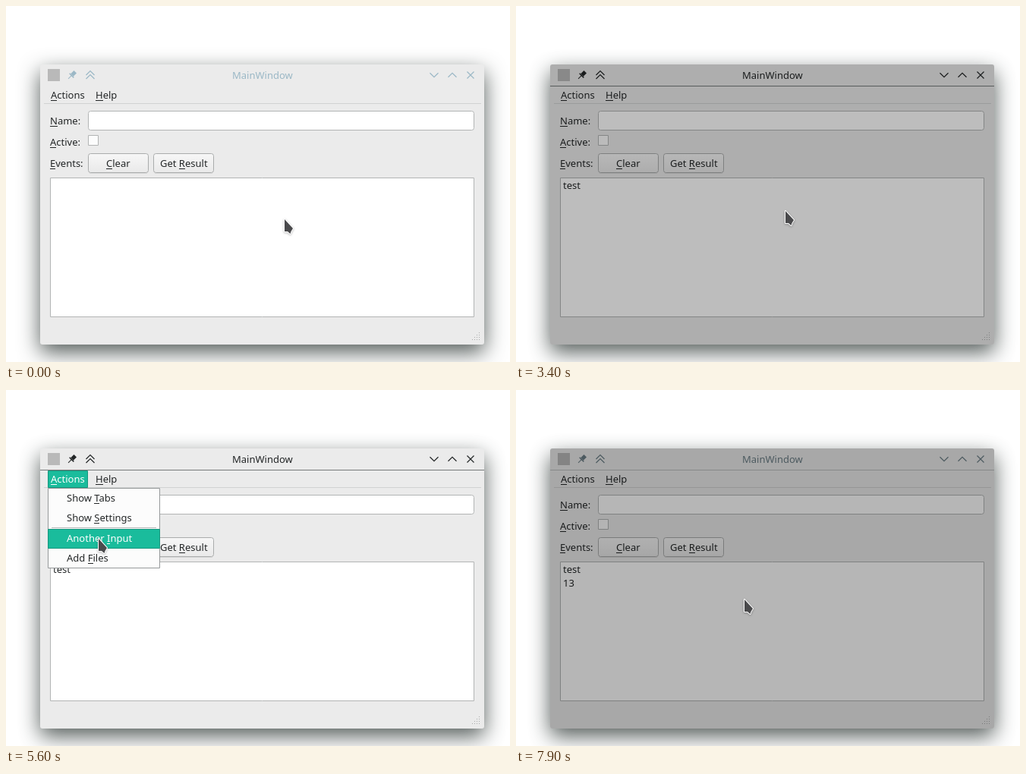
Recreate the animation shown at these times as an HTML page with a canvas. Size 664 by 469 pixels, loop 8000 ms.

```html
<!DOCTYPE html>
<html lang="en">
<head>
<meta charset="utf-8">
<title>Main window demo</title>
<style>
html, body { margin: 0; width: 100%; height: 100%; overflow: hidden; background: #fff; }
canvas { display: block; }
</style>
</head>
<body>
<canvas id="stage" width="664" height="469"></canvas>
<script>
const ctx = document.getElementById('stage').getContext('2d');
const LOOP = 8000, STEP = 100;
const TEAL = '#1abc9c', DARK_TEAL = '#16967d', INK = '#232627', GRAY = '#b2b4b4';

const ICON = {
  down: new Path2D('M-5.5-2.75L0 2.75 5.5-2.75'),
  up: new Path2D('M-5.5 2.75L0-2.75 5.5 2.75'),
  shade: new Path2D('M-5.5 0L0-5.5 5.5 0M-5.5 5L0-.5 5.5 5'),
  close: new Path2D('M-4.5-4.5L4.5 4.5M4.5-4.5L-4.5 4.5'),
  help: new Path2D('M-4-3C-4-8 4-8 4-3 4 0 0-1 0 3M0 5.5V7'),
  check: new Path2D('M-6 0L-2 4 6-4'),
  cancel: new Path2D('M5.5 0A5.5 5.5 0 1 1-5.5 0A5.5 5.5 0 1 1 5.5 0M-4-4L4 4'),
  beam: new Path2D('M-3-8H-1L0-7 1-8H3M0-7V7M-3 8H-1L0 7 1 8H3'),
  arrow: new Path2D('M0 0V16H4L7.5 19 8.5 16 11 12Z')
};

// Keyframes are [time, value...]; values between them are linear.
const MOUSE = [[100, 367, 281], [600, 236, 227], [700, 236, 227], [800, 240, 199], [1300, 240, 199],
  [1600, 240, 202], [1800, 340, 247], [2500, 340, 247], [2800, 355, 270], [3500, 355, 270],
  [4300, 83, 130], [4500, 78, 120], [5200, 78, 120], [5600, 122, 196], [5900, 122, 196],
  [6200, 313, 245], [7000, 313, 245], [7300, 301, 276]];
const DIM = [[1000, 0], [1300, .21], [1600, .39], [3200, .39], [3400, .26], [3800, 0],
  [5900, 0], [6200, .39], [7800, .39], [7900, .285]];
const MAIN_FOCUS = [[700, 0], [900, 1], [1100, 1], [1400, 0], [3200, 0], [3400, 1],
  [5900, 1], [6200, 0], [7800, 0], [7900, .4]];
const FIRST_SHOWN = [[900, 0], [1100, 1], [3100, 1], [3400, 0]];
const SECOND_SHOWN = [[5900, 0], [6100, 1], [7800, 1], [7900, 0]];
const MENU_SHOWN = [[4700, 0], [5000, 1], [5800, 1], [5900, 0]];

function at(keys, t) {
  const i = keys.findIndex(k => k[0] > t);
  if (i === 0) return keys[0].slice(1);
  if (i < 0) return keys[keys.length - 1].slice(1);
  const a = keys[i - 1], b = keys[i], f = (t - a[0]) / (b[0] - a[0]);
  return a.slice(1).map((v, j) => v + (b[j + 1] - v) * f);
}

const fill = (x, y, w, h, color) => { ctx.fillStyle = color; ctx.fillRect(x, y, w, h); };

function box(x, y, w, h, color, border, r = 0) {
  ctx.beginPath();
  ctx.roundRect(x + .5, y + .5, w - 1, h - 1, r);
  ctx.fillStyle = color;
  ctx.fill();
  ctx.strokeStyle = border;
  ctx.lineWidth = 1;
  ctx.stroke();
}

// An ampersand marks the underlined letter.
function text(str, x, y, color = INK, centered = false) {
  const key = str.indexOf('&'), plain = str.replace('&', '');
  const width = s => ctx.measureText(s).width;
  if (centered) x = Math.round(x - width(plain) / 2);
  ctx.fillStyle = color;
  ctx.fillText(plain, x, y);
  if (key >= 0) {
    const left = Math.round(x + width(plain.slice(0, key)));
    ctx.fillRect(left, y + 2, Math.round(width(plain[key])), 1);
  }
}

function icon(name, x, y, color, width = 1.2) {
  ctx.save();
  ctx.translate(x, y);
  ctx.strokeStyle = color;
  ctx.lineWidth = width;
  ctx.stroke(ICON[name]);
  ctx.restore();
}

function pin(x, y, color) {
  ctx.save();
  ctx.translate(x, y);
  ctx.rotate(Math.PI / 4);
  fill(-2.5, -6, 5, 6, color);
  fill(-4, 0, 8, 1.5, color);
  fill(-.5, 1, 1, 6, color);
  ctx.restore();
}

function grip(x, y) {
  for (let r = 0; r < 4; r++)
    for (let c = 3 - r; c < 4; c++) fill(x + c * 3, y + r * 3, 1, 1, '#a9abab');
}

function button(x, y, label, state = '') {
  const g = ctx.createLinearGradient(0, y, 0, y + 26);
  const green = state === 'default';
  g.addColorStop(0, state === 'pressed' ? '#d3dfdc' : green ? '#f0f5f4' : '#f7f7f7');
  g.addColorStop(1, state === 'pressed' ? '#c6d8d3' : green ? '#d3e6e1' : '#e9e9e9');
  fill(x + 2, y + 26, 76, 1, 'rgba(0,0,0,.08)');
  box(x, y, 80, 26, g, state ? DARK_TEAL : '#aaacac', 3);
  if (label) text(label, x + 40, y + 18, INK, true);
}

function dialogButtons(x, y, state) {
  button(x, y, '', state);
  icon('check', x + 29, y + 13, INK, 1);
  text('OK', x + 38, y + 18);
  button(x + 86, y, '');
  icon('cancel', x + 105, y + 13, INK, 1);
  text('Cancel', x + 114, y + 18);
}

function frame(x, y, w, h, title, titleX, focus, line, help) {
  ctx.save();
  ctx.shadowColor = 'rgba(40,50,48,.8)';
  ctx.shadowBlur = 28;
  ctx.shadowOffsetY = 10;
  ctx.fillStyle = '#ebebeb';
  ctx.beginPath();
  ctx.roundRect(x, y, w, h, 3);
  ctx.fill();
  ctx.restore();

  const mix = (a, b) => Math.round(a + (b - a) * focus);
  const color = `rgb(${mix(155, 35)},${mix(184, 38)},${mix(198, 39)})`;
  const cy = y + 14, right = x + w;
  fill(x + 10, cy - 8, 16, 16, '#b9b9b9');
  pin(x + 42, cy, color);
  icon('shade', x + 66, cy, color);
  text(title, titleX, y + 19, color, true);
  if (help) icon('help', right - 90, cy, color);
  icon('down', right - 66, cy, color);
  icon('up', right - 42, cy, color);
  icon('close', right - 18, cy, color);

  ctx.save();
  ctx.globalAlpha *= focus;
  fill(x, y + 28, w, 1, line);
  ctx.restore();
}

function mainWindow(t) {
  frame(45, 77, 585, 369, 'MainWindow', 337.5, at(MAIN_FOCUS, t)[0], '#777a7a');
  text('&Actions', 59, 122);
  text('&Help', 118, 122);
  fill(50, 128, 576, 1, '#d0d2d2');
  text('&Name:', 58, 156);
  box(108, 138, 509, 26, '#fff', GRAY, 3);
  text('&Active:', 58, 184);
  box(108, 170, 14, 14, '#fcfcfc', GRAY);
  text('&Events:', 58, 212);
  button(108, 194, '&Clear');
  button(194, 194, 'Get &Result', t === 800 ? 'hover' : t === 900 ? 'pressed' : '');
  box(58, 226, 559, 184, '#fff', GRAY);
  if (t >= 3200) text('test', 62, 241);
  if (t >= 7900) text('13', 62, 259);
  grip(614, 430);

  ctx.fillStyle = `rgba(0,0,0,${at(DIM, t)[0]})`;
  ctx.beginPath();
  ctx.roundRect(45, 77, 585, 369, 3);
  ctx.fill();
}

function menu(mouseY) {
  const active = mouseY < 130 ? -1 : mouseY < 156 ? 0 : mouseY < 183 ? 1 : 2;
  box(55, 106, 53, 23, TEAL, DARK_TEAL);
  text('&Actions', 59, 122, '#fff');
  box(55, 129, 148, 106, '#fcfcfc', '#96999a');
  fill(60, 181, 138, 1, '#b5b7b7');
  ['Show &Tabs', 'Show &Settings', 'Another &Input', 'Add &Files'].forEach((label, i) => {
    const y = 130 + i * 26 + (i > 1 ? 2 : 0);
    if (i === active) box(55, y - 1, 148, 26, TEAL, DARK_TEAL);
    text(label, 80, y + 17 - (i > 1 ? 1 : 0), i === active ? '#fff' : INK);
  });
}

function resultDialog(t) {
  const focus = at([[1100, 0], [1500, 1]], t)[0];
  frame(150, 164, 366, 137, 'Dialog', 333, focus, TEAL, true);
  text('Enter a result to be reported as event to the main view:', 165, 218);
  box(165, 228, 336, 26, '#fff', DARK_TEAL, 3);
  const count = t < 2200 ? 0 : t < 2600 ? Math.min(3, (t - 2100) / STEP) : 4;
  const typed = 'test'.slice(0, count);
  text(typed, 169, 246);
  if (t < 1700 || count)
    fill(168 + Math.round(ctx.measureText(typed).width), 232, 1, 18, '#000');
  dialogButtons(335, 260, t >= 3000 ? 'pressed' : 'default');
}

function numberDialog(t) {
  const done = t >= 7700;
  frame(229, 164, 208, 138, 'Ra…ut', 328, at([[5900, 0], [6200, 1]], t)[0], TEAL);
  text('Enter a number:', 244, 218);
  box(244, 229, 178, 25, '#fff', done ? GRAY : DARK_TEAL, 3);
  fill(407, 230, 1, 23, '#b5b7b7');
  for (const [y, d] of [[237, -1], [246, 1]]) {
    ctx.beginPath();
    ctx.moveTo(410, y - 2 * d);
    ctx.lineTo(418, y - 2 * d);
    ctx.lineTo(414, y + 2 * d);
    ctx.fillStyle = '#5d6062';
    ctx.fill();
  }
  const selected = t >= 6700 && t < 6900;
  const value = t < 6900 ? '42' : t < 7000 ? '1' : '13';
  if (selected) fill(249, 233, 15, 18, TEAL);
  text(value, 249, 247, selected ? '#fff' : INK);
  if (t < 6400) fill(249, 233, 1, 18, '#000');
  if (t >= 6900 && !done)
    fill(249 + Math.round(ctx.measureText(value).width), 233, 1, 18, '#000');
  dialogButtons(256, 261, done ? 'pressed' : 'default');
  grip(421, 288);
}

function cursor(x, y, beam) {
  if (beam) {
    x = Math.round(x) + .5;
    icon('beam', x, y, '#fff', 3);
    icon('beam', x, y, '#333', 1);
    return;
  }
  ctx.save();
  ctx.translate(Math.round(x), Math.round(y));
  ctx.shadowColor = 'rgba(0,0,0,.3)';
  ctx.shadowBlur = 3;
  ctx.shadowOffsetY = 1;
  ctx.lineJoin = 'round';
  ctx.strokeStyle = '#fff';
  ctx.lineWidth = 2;
  ctx.stroke(ICON.arrow);
  ctx.shadowColor = 'transparent';
  ctx.fillStyle = '#4a4a4c';
  ctx.fill(ICON.arrow);
  ctx.restore();
}

function layer(alpha, paint) {
  if (!alpha) return;
  ctx.globalAlpha = alpha;
  paint();
  ctx.globalAlpha = 1;
}

function draw(now) {
  const t = Math.floor(now % LOOP / STEP) * STEP;
  const [x, y] = at(MOUSE, t);
  ctx.font = '13px "Noto Sans", sans-serif';
  fill(0, 0, 664, 469, '#fff');
  mainWindow(t);
  layer(at(MENU_SHOWN, t)[0], () => menu(y));
  layer(at(FIRST_SHOWN, t)[0], () => resultDialog(t));
  layer(at(SECOND_SHOWN, t)[0], () => numberDialog(t));
  cursor(x, y, (t >= 1800 && t < 2700) || (t >= 6200 && t < 7100));
  requestAnimationFrame(draw);
}
requestAnimationFrame(draw);
</script>
</body>
</html>
```
